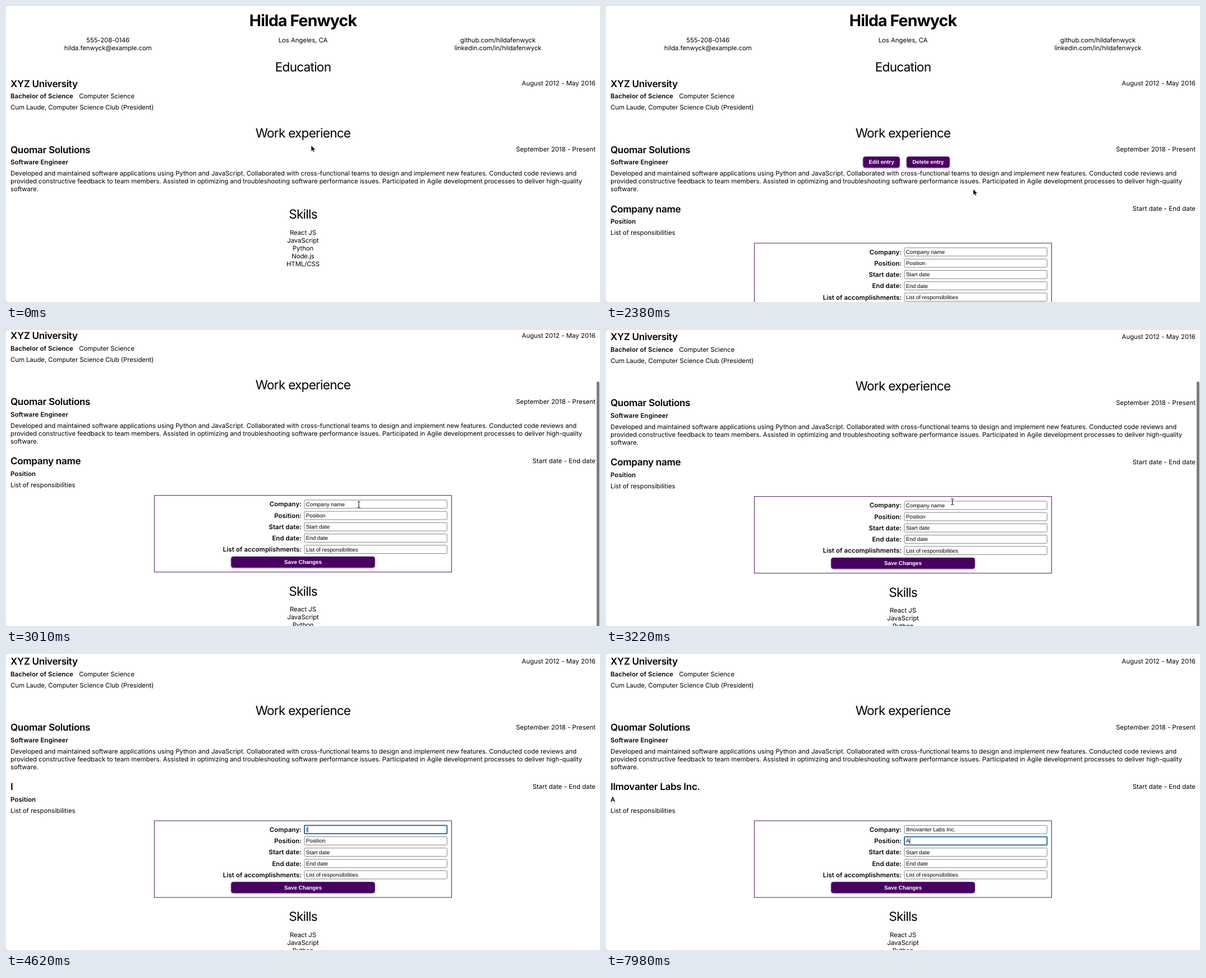
Animation, 1059 px wide and 529 px high, one loop 8 s. Source, as an HTML page:

```html
<!DOCTYPE html>
<html lang="en">
<head>
<meta charset="utf-8">
<title>Resume editor</title>
<style>
  html, body { margin: 0; width: 100%; height: 100%; overflow: hidden; background: #fff; }
  svg { display: block; width: 1059px; height: 529px; }
  text {
    font: 400 11.38px Inter, sans-serif; letter-spacing: -.0045em; fill: #000;
    white-space: pre; text-rendering: geometricPrecision; font-optical-sizing: none;
  }
  .name { font-size: 28.4px; font-weight: 700; letter-spacing: -.029em; }
  .section { font-size: 22.6px; letter-spacing: -.034em; }
  .company { font-size: 17.05px; font-weight: 600; letter-spacing: -.018em; }
  .strong { font-weight: 600; letter-spacing: .009em; }
  .date { letter-spacing: .004em; }
  .field, .label { font: 9.8px "Liberation Sans", Arial, sans-serif; letter-spacing: 0; }
  .label { font-weight: 700; fill: #fff; }
  .button { stroke: rgba(0, 0, 0, .3); filter: drop-shadow(0 1.5px 1.5px rgba(75, 0, 97, .45)); }
  .input { fill: #fff; stroke: #767676; stroke-width: .9; }
  .focused { stroke: #1a5f96; stroke-width: 1.8; }
</style>
</head>
<body>
<svg viewBox="0 0 1059 529">
  <g id="page">
    <g id="resume"></g>
    <g id="entry"></g>
    <g id="skills"></g>
    <g id="add"></g>
    <g id="edit"></g>
  </g>
  <rect id="thumb" x="1053" width="5" height="460" rx="2.5" fill="#7d7d7d"/>
  <path d="M0 0H2L0 1.5ZM0 529H2L0 527.5Z" fill="#777"/>
  <path id="cursor" stroke-linejoin="round"/>
</svg>
<script>
const LOOP = 8000, STEP = 70, CENTER = 529.5, LEFT = 8, RIGHT = 1051;
const $ = id => document.getElementById(id);

function add(parent, tag, attrs, content = '') {
  const el = document.createElementNS('http://www.w3.org/2000/svg', tag);
  for (const key in attrs) el.setAttribute(key, attrs[key]);
  el.textContent = content;
  return parent.appendChild(el);
}
const write = (parent, x, y, content, cls = '', anchor = 'start') =>
  add(parent, 'text', { x, y, class: cls, 'text-anchor': anchor }, content);
const centered = (parent, x, y, content, cls) => write(parent, x, y, content, cls, 'middle');

function button(parent, x, y, width, content, fill = '#490061') {
  add(parent, 'rect', { x: x + .5, y: y + .5, width: width - 1, height: 19.5, rx: 4, fill, class: 'button' });
  centered(parent, x + width / 2, y + 13.6, content, 'label');
}

function job(parent, y, company, dates, position) {
  const title = write(parent, LEFT, y, company, 'company');
  write(parent, RIGHT, y - 2.1, dates, 'date', 'end');
  return [title, write(parent, LEFT, y + 20.8, position, 'strong')];
}

// Resume
const resume = $('resume');
centered(resume, CENTER, 36, 'Hilda Fenwyck', 'name');
centered(resume, 181.8, 65.2, '555-208-0146');
centered(resume, 181.8, 79.2, 'hilda.fenwyck@example.com');
centered(resume, CENTER, 65.2, 'Los Angeles, CA');
centered(resume, 877, 65.2, 'github.com/hildafenwyck');
centered(resume, 877, 79.2, 'linkedin.com/in/hildafenwyck');

centered(resume, CENTER, 116.5, 'Education', 'section');
job(resume, 144.5, 'XYZ University', 'August 2012 - May 2016', 'Bachelor of Science');
write(resume, 130.3, 165.3, 'Computer Science');
write(resume, LEFT, 185.3, 'Cum Laude, Computer Science Club (President)');

centered(resume, CENTER, 234.5, 'Work experience', 'section');
job(resume, 262.5, 'Quomar Solutions', 'September 2018 - Present', 'Software Engineer');
[
  'Developed and maintained software applications using Python and JavaScript. Collaborated with cross-functional teams to design and implement new features. Conducted code reviews and',
  'provided constructive feedback to team members. Assisted in optimizing and troubleshooting software performance issues. Participated in Agile development processes to deliver high-quality',
  'software.'
].forEach((line, i) => write(resume, LEFT, 303.3 + 14 * i, line));

const skills = $('skills');
centered(skills, CENTER, 380.3, 'Skills', 'section');
['React JS', 'JavaScript', 'Python', 'Node.js', 'HTML/CSS']
  .forEach((skill, i) => centered(skills, CENTER, 408.7 + 14 * i, skill));

// New entry with its form
const entry = $('entry');
const titles = job(entry, 368.5, 'Company name', 'Start date - End date', 'Position');
write(entry, LEFT, 409.3, 'List of responsibilities');
add(entry, 'rect', { x: 264.5, y: 423.8, width: 530, height: 137, fill: 'none', stroke: '#4c1c5c' });

const fields = [
  ['Company:', 'Company name'], ['Position:', 'Position'], ['Start date:', 'Start date'],
  ['End date:', 'End date'], ['List of accomplishments:', 'List of responsibilities']
].map(([label, value], i) => {
  const y = 439.5 + 20.2 * i;
  write(entry, 527, y + 4.2, label, 'strong', 'end');
  return {
    box: add(entry, 'rect', { x: 532, y: y - 7.4, width: 254.3, height: 14.8, rx: 1.5 }),
    selection: add(entry, 'rect', { x: 534.7, y: y - 5.5, height: 11, fill: '#b3d7ff' }),
    text: write(entry, 534.7, y + 3.5, value, 'field'),
    caret: add(entry, 'rect', { y: y - 5.2, width: .9, height: 10.4 })
  };
});
button(entry, 401, 532.8, 257, 'Save Changes');

// Hover buttons
button($('add'), 459, 211.3, 141, 'Add new work experience', '#6d0092');
button($('edit'), 458, 268.8, 66, 'Edit entry');
button($('edit'), 535.5, 268.8, 77.5, 'Delete entry');

// Motion
const shapes = {
  arrow: ['M0 0V11.2L2.6 8.8 4.3 12.6 6.1 11.8 4.4 8.1H8Z', '#000', '#fff', .8],
  hand: ['M-1 1q1-2 2 0v4l1-.6q1 0 1 .8q1.6-.5 2 .6q1.5-.2 1.6 1v3l-1 3.4h-5l-3.5-5q-.3-1.5 1.9-.4z', '#fff', '#000', .9],
  beam: ['M-2.5-5.5Q0-5.5 0-4V4Q0 5.5-2.5 5.5M2.5-5.5Q0-5.5 0-4M0 4Q0 5.5 2.5 5.5', 'none', '#000', 1]
};
const cursorPath = [
  [0, 544, 249], [210, 543, 244], [420, 538, 231], [630, 534, 222], [840, 532.5, 220],
  [1120, 531.5, 220.5], [1820, 531.5, 220.5], [1890, 531, 221.5], [2100, 531, 221.5],
  [2170, 546, 230], [2240, 590, 268], [2310, 640, 314], [2380, 654.5, 327], [2590, 654.5, 327],
  [3010, 629, 312], [3220, 617.5, 307], [3360, 615, 307], [3570, 612, 311],
  [3710, 615, 313], [3920, 617, 312]
];
const scrollPath = [
  [2520, 0], [2590, 8], [2730, 62], [2870, 114], [2940, 125], [3010, 128.2],
  [3080, 127.8], [3220, 126.2], [3360, 125.7]
];
const company = 'Ilmovanter Labs Inc.';
const keyTimes = [
  4620, 4830, 4970, 5110, 5180, 5320, 5390, 5460, 5670, 5810,
  5880, 6090, 6160, 6230, 6440, 6510, 6790, 6930, 7070, 7210
];

const ramp = (t, a, b) => Math.min(1, Math.max(0, (t - a) / (b - a)));
const within = (t, a, b) => t >= a && t < b;

function follow(path, t) {
  const next = path.findIndex(key => key[0] > t);
  if (next < 0) return path[path.length - 1].slice(1);
  if (next === 0) return path[0].slice(1);
  const a = path[next - 1], b = path[next], k = ramp(t, a[0], b[0]);
  return a.slice(1).map((v, i) => v + (b[i + 1] - v) * k);
}

function draw(t) {
  const [scroll] = follow(scrollPath, t);
  const created = t >= 1540;
  $('page').setAttribute('transform', `translate(0 ${-scroll})`);
  entry.style.display = created ? '' : 'none';
  skills.setAttribute('transform', `translate(0 ${created ? 222.7 : 0})`);

  $('add').style.opacity = ramp(t, 350, 560) * (t < 2240);
  $('edit').style.opacity = ramp(t, 0, 140) * (1 - ramp(t, 280, 420)) + within(t, 2240, 2660);

  const typed = keyTimes.filter(time => time <= t).length;
  const values = [typed ? company.slice(0, typed) : 'Company name', t >= 7980 ? 'A' : 'Position'];
  const focus = t < 3500 ? -1 : t < 7350 ? 0 : 1;
  const selected = within(t, 3710, 4620) || within(t, 7350, 7980);
  values.forEach((value, i) => titles[i].textContent = fields[i].text.textContent = value);
  fields.forEach(({ box, selection, text, caret }, i) => {
    const active = i === focus, width = active ? text.getComputedTextLength() : 0;
    box.setAttribute('class', active ? 'input focused' : 'input');
    selection.setAttribute('width', selected ? width : 0);
    caret.setAttribute('x', 534.9 + width);
    caret.style.display = active && !selected ? '' : 'none';
  });

  const thumb = $('thumb');
  thumb.setAttribute('y', 92 * Math.min(1, scroll / 125.7));
  thumb.style.opacity = t < 2590 ? 0 : 1 - ramp(t, 3360, 3570);

  const cursor = $('cursor');
  const [d, fill, stroke, weight] = shapes[within(t, 490, 2170) ? 'hand' : t < 2870 ? 'arrow' : 'beam'];
  const position = follow(cursorPath, t);
  Object.entries({ d, fill, stroke, 'stroke-width': weight, transform: `translate(${position})` })
    .forEach(([key, value]) => cursor.setAttribute(key, value));
  cursor.style.display = t < 4620 ? '' : 'none';
}

function tick() {
  draw(Math.floor(performance.now() % LOOP / STEP) * STEP);
  requestAnimationFrame(tick);
}
tick();
</script>
</body>
</html>
```
